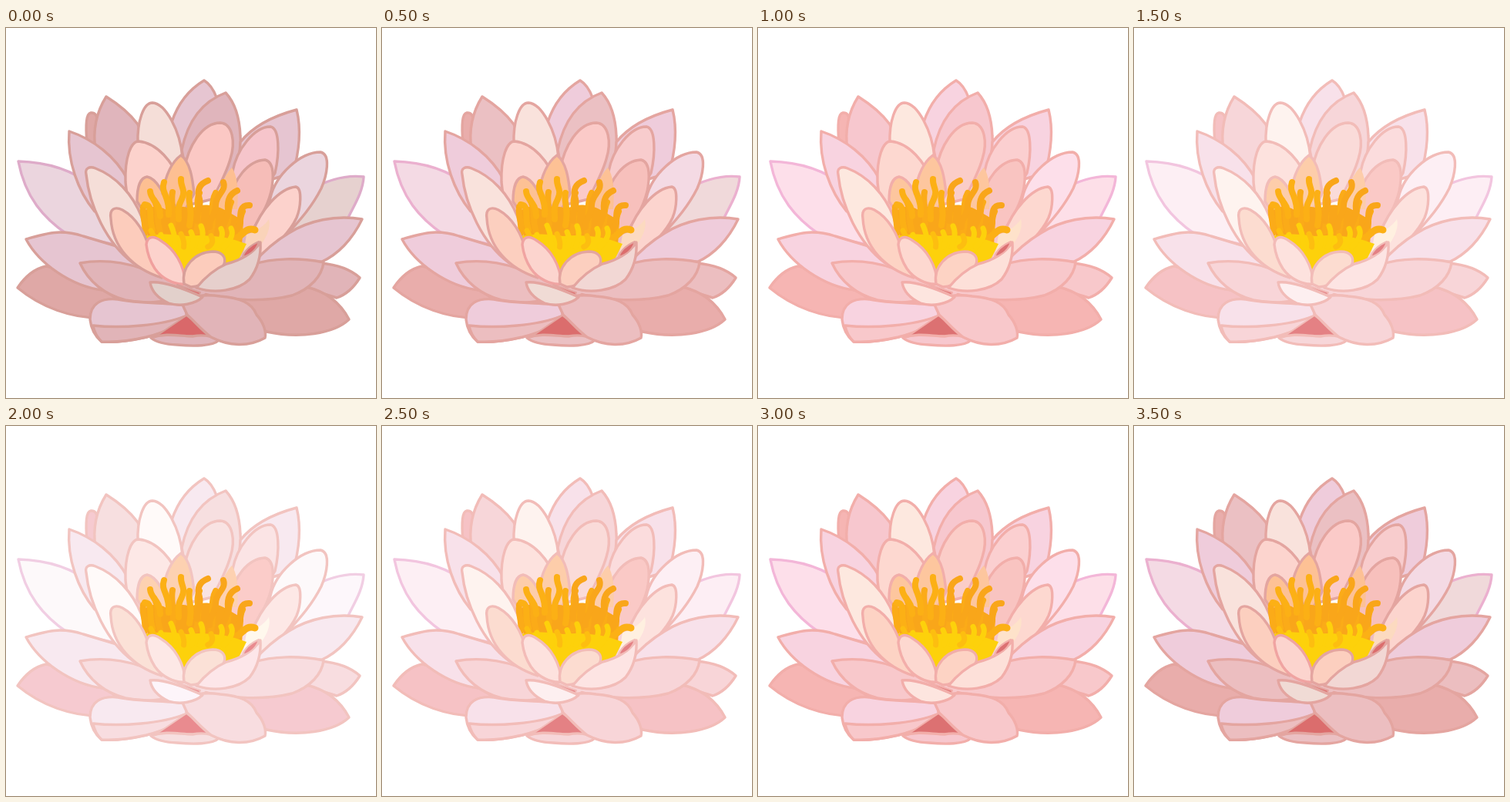
An HTML page for the animation above (4 s loop, 480 by 480 pixels).

```html
<!DOCTYPE html>
<html lang="en">
<head>
<meta charset="utf-8">
<title>Water lily</title>
<style>
html, body { margin: 0; width: 100%; height: 100%; overflow: hidden; background: #fff; }
svg { display: block; width: 100vw; height: 100vh; }
path { stroke-linejoin: round; stroke-linecap: round; }
</style>
</head>
<body>
<svg id="lily" viewBox="0 0 480 480"></svg>
<script>
const STEP = 500;
const LEVELS = [0, 1, 2, 3, 4, 3, 2, 1];

// Each tone runs from shaded to bright; the brightest level is extrapolated.
const TONES = {
  line:  'd89f99 e4a5a0 f2aeaa f2bcb8',
  mauve: 'deabc9 ebb0cf f3b6d8 f2c5df',
  glow:  'f0a09e f0a4a2 f3aeaa f3bcb8',
  lilac: 'e6c5d1 efccdb f8d3e0 f8e1ea',
  pale:  'ebd5de f4dae4 fddfea fdeff4',
  haze:  'e6d1cf f0d9da fddfe8 fdeef4',
  pink:  'e0b5bc ebc0c3 f7c7ce f7d6d9',
  mid:   'e1b4b8 ecbec0 f8c8cb f8d5d8',
  rose:  'dfa8a6 e9adab f6b5b3 f6c2c5',
  cream: 'f5ded8 f9e2dc fde8df fef3ef',
  coral: 'fbc8c4 fbcac8 fbcdc8 fadbd9',
  flesh: 'f6bdb8 f7c0bc f9c4c1 fac9c6',
  blush: 'f6c5cb f8cccd fbcfd0 fbdcdd',
  shell: 'fcd2cc fcd4ce fdd8d0 fde2de',
  peach: 'fcccbc fccfbf fdd3c4 fcdcd0',
  amber: 'fdbf92 fdc195 fdc69e fdcdaa',
  ivory: 'fad3b9 fcdac0 fee2ca fff0e0',
  pearl: 'e6cfcc f2d7d4 fde0d9 fde4e3',
  grey:  'e2d0cb f0dbd5 fde5df fdeff0',
  red:   'd9686a db6d6d dc7172 e48184'
};

const svg = document.getElementById('lily');

function draw(d, fill, stroke = 'none', width = 3.4) {
  const p = document.createElementNS('http://www.w3.org/2000/svg', 'path');
  p.setAttribute('d', d);
  p.style.fill = fill;
  p.style.stroke = stroke;
  p.style.strokeWidth = width;
  svg.append(p);
}

const petal = (tone, d, edge = 'line') => draw(d, `var(--${tone})`, `var(--${edge})`);
const strand = (color, d, width = 8) => draw(d, 'none', color, width);

// Outer and back petals
petal('rose', 'M105 150C103 125 104 111 110 110Q118 109 119 122L114 160Z');
petal('pale', 'M16 173C50 174 85 183 112 205L160 285L80 268C49 247 25 220 16 173Z', 'mauve');
petal('haze', 'M464 193C440 190 415 198 392 211L355 280L444 246C451 231 463 213 464 193Z', 'mauve');
petal('lilac', 'M257 68C237 80 223 98 215 122L228 170L260 150L273 90Q267 74 257 68Z');
petal('pink', 'M285 84C258 94 237 115 228 158L240 220L285 200C300 178 306 160 304 140C303 117 297 97 285 84Z');
petal('lilac', 'M377 106C347 114 320 128 304 148L300 210L372 188C381 160 383 130 377 106Z');
petal('pink', 'M130 89C118 108 112 130 116 158L160 220L190 170L171 125C160 110 146 99 130 89Z');
petal('lilac', 'M82 134C79 172 93 211 115 238L175 260L158 197C142 166 112 144 82 134Z');
petal('cream', 'M171 150C170 122 178 97 190 97C207 98 226 133 229 168L215 215L180 200Z');
petal('coral', 'M231 185C236 153 255 123 278 123C294 124 298 148 291 170C286 188 278 202 268 222L235 230Z');
petal('blush', 'M294 186C299 158 322 128 343 128C355 130 355 162 349 188L310 250L285 235Z');
petal('pale', 'M343 220C350 190 382 161 408 161C422 164 416 192 409 208C398 230 383 248 362 270L330 275Z');
petal('flesh', 'M290 225C295 196 314 172 336 171C349 174 347 197 344 212C338 236 325 255 310 275L285 260Z');
petal('shell', 'M320 265C330 237 354 208 376 206C385 208 382 234 377 246C369 264 349 284 330 298L310 290Z');
petal('shell', 'M155 200C154 168 162 147 172 147C196 149 217 174 226 200L215 255L175 260Q158 235 155 200Z');

// Lower ring
petal('rose', 'M15 337C25 322 38 312 52 309C85 315 125 335 145 353L125 376C85 377 45 362 15 337Z');
petal('lilac', 'M26 274C40 270 55 265 70 265Q85 265 100 270L190 297L165 340H125C85 335 43 306 26 274Z');
petal('mid', 'M459 324C447 313 430 307 408 305L380 335L429 350C441 346 451 337 459 324Z');
petal('rose', 'M445 378C434 357 415 342 390 336L290 345L325 387L338 394C380 403 425 397 445 378Z');
petal('lilac', 'M462 248C428 242 392 250 367 266C350 276 333 291 320 306L410 303C430 294 449 275 462 248Z');
petal('mid', 'M412 304C380 298 346 298 320 307C296 315 270 331 253 344C290 355 340 355 371 347C396 338 410 321 412 304Z');

petal('cream', 'M104 190C102 182 108 179 116 182C142 192 164 215 176 245L190 300L165 305C130 279 108 230 104 190Z');
petal('mid', 'M96 305C128 299 170 304 202 325L225 350C205 356 178 358 155 353C128 346 107 329 96 305Z');

// Peach petals around the stamens
draw('M185 270H328L320 300L250 350L195 330Z', 'var(--mid)');
petal('amber', 'M170 225C170 205 175 194 183 193C195 195 206 215 212 235L195 265Z');
petal('amber', 'M203 215C207 190 216 173 227 165C239 174 242 195 244 215L230 240Z');
draw('M293 181C281 194 275 212 274 236L300 235Q303 196 293 181Z', 'var(--amber)');
draw('M312 268C326 263 336 256 341 248Q345 263 328 285L308 292Z', 'var(--ivory)');

// Stamens
const DEEP = '#f9a61a', WARM = '#fcb015', GOLD = '#fdd10b';
draw('M177 240Q190 226 208 236Q222 228 240 234Q262 224 284 236L308 250L306 282L240 295L185 275Z', DEEP);
[
  'M178 232C176 243 182 252 180 266',
  'M192 223C200 235 194 248 200 264',
  'M216 213C213 226 219 238 216 262',
  'M251 214C245 226 253 240 247 264',
  'M272 214C264 228 271 245 266 266',
  'M292 226C285 240 292 252 284 270',
  'M307 238C301 250 306 262 298 278'
].forEach(d => strand('#fbab18', d));
[
  'M180 229C192 230 184 246 190 262',
  'M187 212C188 224 200 226 200 244',
  'M205 200C200 214 213 218 211 242',
  'M227 196C226 206 234 210 228 222S224 236 224 248',
  'M238 214C235 226 243 232 238 256'
].forEach(d => strand(WARM, d));
[
  'M262 198C249 203 248 212 251 222S246 238 248 250',
  'M282 200C286 212 272 216 272 230S264 246 264 258',
  'M300 211C288 216 287 226 288 236S280 254 280 266',
  'M316 230C303 229 304 242 304 250S296 262 294 276'
].forEach(d => strand(DEEP, d));
strand(WARM, 'M323 262C311 258 308 268 300 272S294 282 287 281', 9);

// Yellow heart with an uneven rim
draw('M180 270Q205 265 235 270Q275 266 312 280L300 304L245 328L205 312Z', GOLD);
for (let i = 0; i < 9; i++) {
  const x = 188 + i * 13;
  const top = 263 + 7 * Math.sin(i * 2.3);
  strand(i % 3 ? GOLD : '#fdbe10', `M${x} ${top}Q${x + 5} ${top + 10} ${245 + (x - 245) * 0.8} 284`, 7);
}

// Front petals
petal('peach', 'M136 247C134 235 141 231 151 236C169 246 182 267 187 292L202 324C164 312 138 284 136 247Z');
petal('shell', 'M182 281C183 270 191 269 201 276C219 287 231 307 233 332C219 334 202 325 193 312Q184 298 182 281Z', 'glow');
petal('peach', 'M231 332C227 311 244 291 268 290C280 290 286 297 283 306C275 323 256 335 240 336Z');
petal('pearl', 'M330 278C321 291 306 301 286 306C270 313 256 326 247 337C270 345 301 341 316 326C326 313 331 296 330 278Z');
draw('M307 297C310 287 319 281 328 277C325 289 317 294 307 297Z', 'var(--red)', 'var(--line)', 2);

petal('lilac', 'M109 378C109 357 124 350 145 352C173 358 210 356 234 360V374C225 387 205 395 182 401C160 406 140 408 124 407Q111 396 109 378Z');
petal('mid', 'M113 386C150 390 202 386 232 374C222 388 205 395 182 401C160 406 140 408 124 407Q115 398 113 386Z');
draw('M234 373L193 401Q232 396 275 403Z', 'var(--red)', 'var(--line)', 2);
petal('pink', 'M188 402C208 395 225 400 242 400C258 397 268 400 276 405C269 413 242 413 222 411Q198 410 188 402Z');
petal('mid', 'M229 359C236 347 258 345 278 348C303 350 319 356 325 372C334 382 338 394 336 402C315 414 289 413 266 401C253 391 245 381 235 372Z');
draw('M222 333L252 343L250 349Z', 'var(--red)', 'var(--line)', 2);
petal('grey', 'M187 330C204 328 235 340 255 349C246 358 226 362 211 357C198 351 189 343 187 330Z');

const channels = hex => [0, 2, 4].map(i => parseInt(hex.slice(i, i + 2), 16));
const palette = Object.entries(TONES).map(([name, row]) => {
  const shades = row.split(' ').map(channels);
  const [, , soft, light] = shades;
  shades.push(light.map((v, i) => Math.min(255, Math.round(v + (v - soft[i]) * 0.6))));
  return [name, shades];
});

let shown = -1;
function tick() {
  const level = LEVELS[Math.floor(performance.now() / STEP) % LEVELS.length];
  if (level !== shown) {
    shown = level;
    for (const [name, shades] of palette) svg.style.setProperty('--' + name, `rgb(${shades[level]})`);
  }
  requestAnimationFrame(tick);
}
tick();
</script>
</body>
</html>
```
